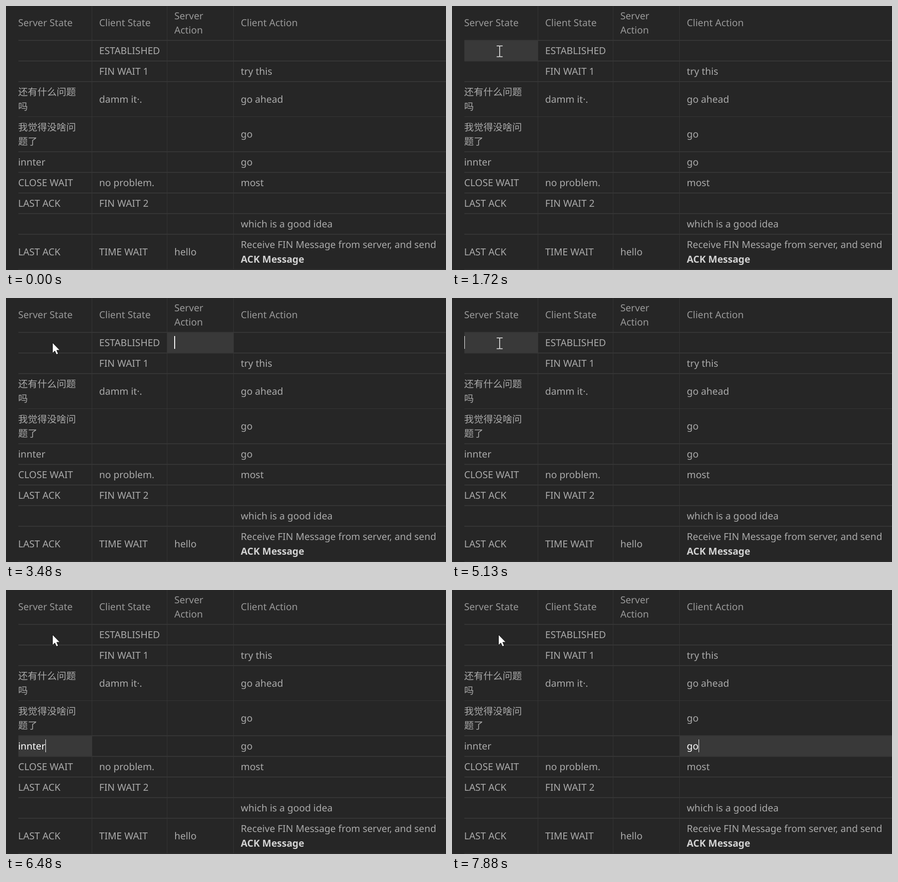
An HTML page for the animation above (8000 ms loop, 960 by 576 pixels).

```html
<!DOCTYPE html>
<html lang="zh-CN">
<head>
<meta charset="utf-8">
<title>Table navigation</title>
<style>
  html, body { margin: 0; width: 100%; height: 100%; overflow: hidden; background: #262626; }
  svg { display: block; width: 960px; height: 576px; }
  text {
    font: 21px "Noto Sans", "Noto Sans CJK SC", sans-serif;
    fill: #aaa; white-space: pre; text-rendering: geometricPrecision;
  }
  .head text { fill: #999; }
  .strong { font-weight: 700; fill: #d2d2d2; }
  .active text { fill: #fff; }
  #lines { fill: #363636; }
  #focus { fill: #393939; }
  #caret { fill: #fff; }
  #arrow { fill: #fff; stroke: #111; }
  #beam { fill: none; stroke: #ddd; stroke-width: 1.8; }
</style>
</head>
<body>
<svg viewBox="0 0 960 576">
  <g id="lines" shape-rendering="crispEdges"></g>
  <rect id="focus" shape-rendering="crispEdges"/>
  <g id="cells"></g>
  <rect id="caret" shape-rendering="crispEdges"/>
  <path id="arrow" d="M.5.5V23.5L5.5 18.5 9 26.3 13 24.6 9.6 17H16.5Z"/>
  <path id="beam" d="M97.5 87.2H103L104 88.2 105 87.2H110.5M97.5 110.6H103L104 109.6 105 110.6H110.5M104 88V110"/>
</svg>
<script>
const LOOP = 8000, BLINK = 530, LINE = 31.5;
const $ = id => document.getElementById(id);

// "/" breaks a line, "*" marks a bold one
const table = [
  ["Server State", "Client State", "Server/Action", "Client Action"],
  ["", "ESTABLISHED", "", ""],
  ["", "FIN WAIT 1", "", "try this"],
  ["还有什么问题/吗", "damm it·.", "", "go ahead"],
  ["我觉得没啥问/题了", "", "", "go"],
  ["innter", "", "", "go"],
  ["CLOSE WAIT", "no problem.", "", "most"],
  ["LAST ACK", "FIN WAIT 2", "", ""],
  ["", "", "", "which is a good idea"],
  ["LAST ACK", "TIME WAIT", "hello", "Receive FIN Message from server, and send/*ACK Message"]
];
const rowY = [-1.5, 75, 120, 165, 241.5, 318, 363, 408, 453, 498, 574.5];
const colX = [26, 187, 351, 496, 960];
const textX = [26.4, 203.25, 367.25, 512.25];

// time, row, column, time of the caret
const moves = [
  [1150, 1, 0, 1190], [1980, 1, 1, 2050], [2380, 1, 2], [2730, 1, 3, 2750],
  [3480, 1, 2], [3740, 1, 1], [4070, 1, 0], [5540, 2, 0, 5610],
  [5940, 3, 0], [6210, 4, 0], [6480, 5, 0], [7340, 5, 1],
  [7540, 5, 2, 7610], [7880, 5, 3]
];

function set(el, attrs) {
  for (const key in attrs) el.setAttribute(key, attrs[key]);
  return el;
}

function add(parent, tag, attrs) {
  const el = document.createElementNS("http://www.w3.org/2000/svg", tag);
  return parent.appendChild(set(el, attrs));
}

function makeCell(content, row, col) {
  const group = add($("cells"), "g", row ? {} : { class: "head" });
  const lines = content.split("/");
  const top = (rowY[row] + rowY[row + 1] - LINE * lines.length) / 2 + 1.45;
  let last, y;
  lines.forEach((line, i) => {
    y = Math.round(top + i * LINE);
    last = add(group, "text", { x: textX[col], y: y + 22 });
    if (line[0] === "*") last.setAttribute("class", "strong");
    last.textContent = line.replace("*", "");
  });
  return { group, last, y, content };
}

const cells = table.map((row, r) => row.map((content, c) => makeCell(content, r, c)));

for (const x of colX.slice(1, 4)) add($("lines"), "rect", { x, y: 0, width: 1, height: 575 });
for (const y of rowY.slice(1)) {
  const top = Math.ceil(y) - 1;
  add($("lines"), "rect", { x: 27, y: top, width: 933, height: Math.floor(y) + 1 - top });
}

function show(id, on) {
  $(id).style.display = on ? "" : "none";
}

function drawFocus(t) {
  const move = moves.filter(m => m[0] <= t).pop();
  for (const cell of cells.flat()) cell.group.classList.remove("active");
  show("focus", move);
  if (!move) {
    show("caret", false);
    return false;
  }
  const [start, row, col, caretStart = start] = move;
  const cell = cells[row][col];
  cell.group.classList.add("active");
  const x = colX[col] + 1, y = Math.floor(rowY[row]) + 1;
  set($("focus"), { x, y, width: colX[col + 1] - x, height: Math.ceil(rowY[row + 1]) - 1 - y });

  const end = textX[col] + (cell.content ? cell.last.getComputedTextLength() : 0);
  set($("caret"), {
    x: Math.max(27, Math.round(end)), y: cell.y,
    width: cell.content || !col ? 1 : 2, height: 28
  });
  show("caret", t >= caretStart && Math.floor((t - caretStart) / BLINK) % 2 === 0);
  return row === 1 && col === 0;
}

function drawPointer(t, editing) {
  const step = Math.min(11, Math.max(0, Math.floor((t - 260) / 67.2)));
  const p = step / 11, ease = p * p * (3 - 2 * p);
  const x = Math.round(582 - 481 * ease), y = Math.round(487 - 390 * ease);
  set($("arrow"), { transform: `translate(${x} ${y})` });
  show("arrow", t >= 260 && !editing);
  show("beam", editing);
}

function draw() {
  const t = performance.now() % LOOP;
  drawPointer(t, drawFocus(t));
  requestAnimationFrame(draw);
}
draw();
</script>
</body>
</html>
```
